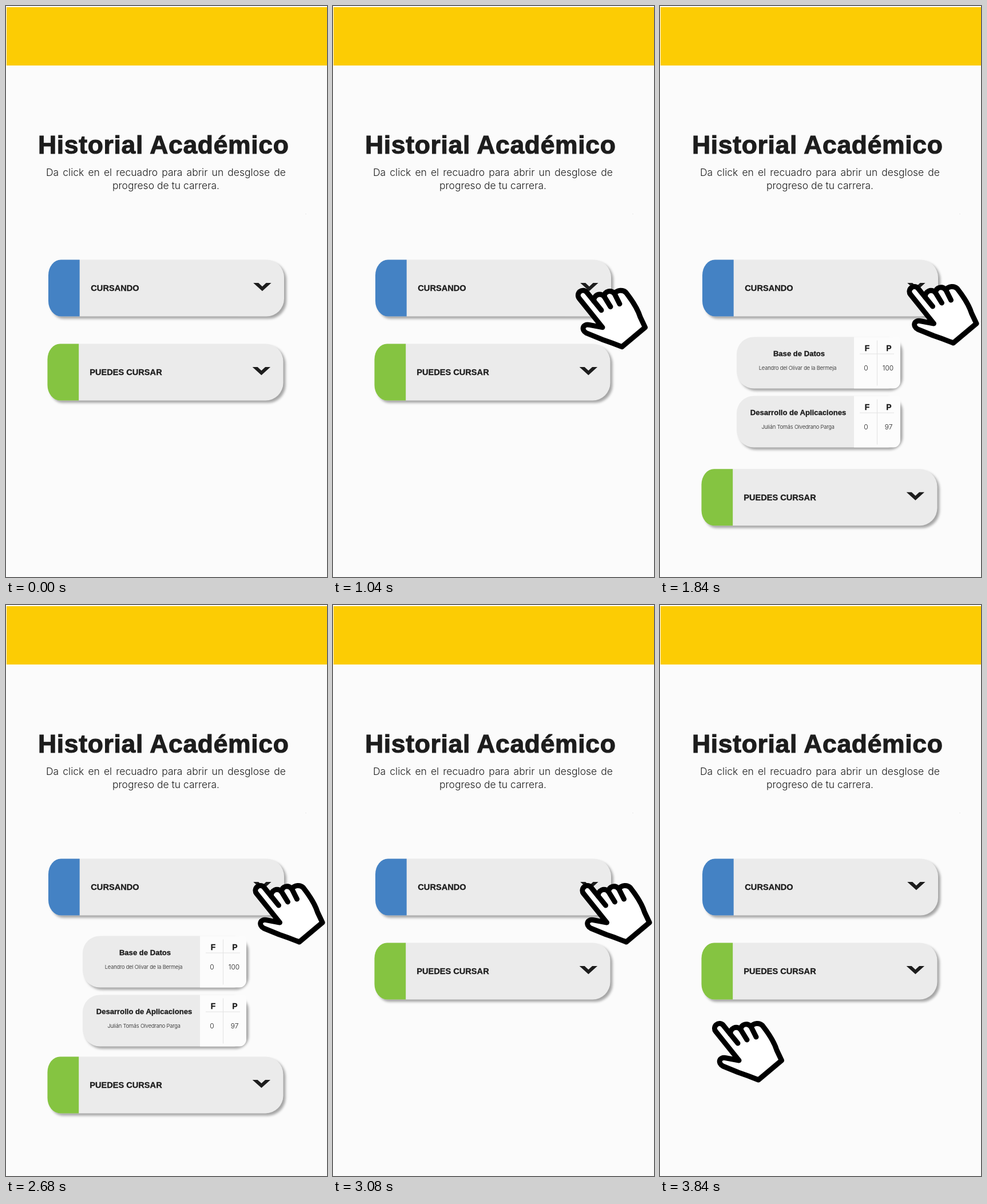
Write an HTML page that moves like this. It is 561 by 998 pixels and loops after 4000 ms.

```html
<!DOCTYPE html>
<html lang="es">
<head>
<meta charset="utf-8">
<title>Historial Académico</title>
<style>
  html, body { margin: 0; width: 100%; height: 100%; overflow: hidden; background: #fbfbfb; }
  svg { position: absolute; left: 0; top: 0; display: block; }
  text {
    font-family: "Liberation Sans", Arial, sans-serif; font-weight: 700;
    fill: #1d1d1d; stroke: #1d1d1d; stroke-width: .3;
  }
  .intro {
    position: absolute; left: 70px; top: 279px; width: 419px;
    font: 300 17.5px/23px Inter, "Liberation Sans", sans-serif; color: #1d1d1d; white-space: nowrap;
  }
  .spread { text-align: justify; text-align-last: justify; }
  .center { text-align: center; }
  .title { font-size: 44.5px; letter-spacing: .65px; stroke-width: 1.1; }
  .label { font-size: 14.6px; }
  .subject { font-size: 13.1px; text-anchor: middle; }
  .head { font-size: 14px; text-anchor: middle; }
  .teacher, .score {
    font-family: Inter, "Liberation Sans", sans-serif; font-weight: 300; text-anchor: middle; stroke: none;
  }
  .teacher { font-size: 9.4px; letter-spacing: -.2px; }
  .score { font-size: 12px; }
  .shadow { filter: drop-shadow(4px 4px 2px rgba(0, 0, 0, .34)); }
  .card .shadow { filter: drop-shadow(3px 3px 2px rgba(0, 0, 0, .34)); }
</style>
</head>
<body>
<svg width="561" height="998" viewBox="0 0 561 998">
  <defs>
    <g id="bar">
      <path class="shadow" fill="#ebebeb" d="M22 0H381a31 31 0 0 1 31 31v37a31 31 0 0 1-31 31H22a22 27 0 0 1-22-27V27a22 27 0 0 1 22-27z"/>
      <path fill="currentColor" d="M22 0H54.700V99H22a22 27 0 0 1-22-27V27a22 27 0 0 1 22-27z"/>
      <path fill="#1d1d1d" d="M358.200 40.500h9l6.700 6.200 6.700-6.200h9l-15.700 14.200z"/>
    </g>
    <g id="card">
      <path class="shadow" fill="#ebebeb" d="M30 0H264a22 22 0 0 1 22 22v46a22 22 0 0 1-22 22H30a30 30 0 0 1-30-30V30a30 30 0 0 1 30-30z"/>
      <path fill="#fcfcfc" d="M205 0H282a4 4 0 0 1 4 4v74a12 12 0 0 1-12 12H205z"/>
      <path fill="none" stroke="#e2e2e2" d="M215 29.500h60M245.500 6v79"/>
      <text class="head" x="228" y="24.500">F</text>
      <text class="head" x="266" y="24.500">P</text>
      <text class="score" x="226" y="58">0</text>
    </g>
  </defs>

  <path fill="#fff" d="M0 0H561V2H1V998H0z"/>
  <path fill="#fccc04" d="M1 2H561V104H1z"/>
  <text class="title" x="56" y="258">Historial Académico</text>
  <path fill="#e8e8e8" d="M523 363h2v1h-2z"/>

  <g class="card" id="first">
    <use href="#card"/>
    <text class="subject" x="109" y="33.500">Base de Datos</text>
    <text class="teacher" x="106.500" y="57">Leandro del Olivar de la Bermeja</text>
    <text class="score" x="264.500" y="58">100</text>
  </g>
  <g class="card" id="second">
    <use href="#card"/>
    <text class="subject" x="107.500" y="33.500">Desarrollo de Aplicaciones</text>
    <text class="teacher" x="107" y="57">Julián Tomás Olvedrano Parga</text>
    <text class="score" x="265.500" y="58">97</text>
  </g>

  <g transform="translate(74 443.5)">
    <use href="#bar" color="#4482c4"/>
    <text class="label" x="74.300" y="54.500">CURSANDO</text>
  </g>
  <g id="available">
    <use href="#bar" color="#85c441"/>
    <text class="label" x="73.700" y="54.500">PUEDES CURSAR</text>
  </g>

  <g id="hand" stroke="#000" stroke-width="9" stroke-linecap="round" stroke-linejoin="round" visibility="hidden">
    <path fill="#fff" d="M47 69L6.400 18.400A8.500 8.500 0 0 1 19.600 7.600L32 23C31 13 43 7 50 15C51 5 62 3 68 10C73 3 83 3 88 8C99 22 109 38 113 51L121.500 69L81 103Q64 96 46 90L19 79C9 73 13 63 23 64.500z"/>
    <path fill="none" d="M32 23L45 39M50 15L61 33M68 10L77 28"/>
  </g>
</svg>
<div class="intro">
  <div class="spread">Da click en el recuadro para abrir un desglose de</div>
  <div class="center">progreso de tu carrera.</div>
</div>
<script>
  const LOOP = 4000, STEP = 40;
  const [first, second, available, hand] =
    ['first', 'second', 'available', 'hand'].map(id => document.getElementById(id));

  const progress = (t, from, to) => Math.min(1, Math.max(0, (t - from) / (to - from)));
  const easeOut = p => 1 - (1 - p) ** 1.65;
  const mix = (a, b, p) => a + (b - a) * p;
  const place = (el, x, y) => el.setAttribute('transform', `translate(${x} ${y})`);

  function draw(now) {
    const t = Math.floor((now % LOOP) / STEP) * STEP;

    const barOpen = progress(t, 1360, 1730) - progress(t, 2640, 3080);
    place(available, 72.5, mix(590.5, 809.3, barOpen));

    const cardsOpen = progress(t, 1447, 1840) - progress(t, 2680, 3080);
    place(first, 134, mix(444, 578.5, cardsOpen));
    place(second, 134, mix(444, 681.5, cardsOpen));

    const arrive = easeOut(progress(t, 560, 1120));
    const leave = progress(t, 3280, 3840);
    place(hand, mix(mix(244, 431.5, arrive), 91, leave), mix(mix(652, 486, arrive), 727, leave));
    hand.setAttribute('visibility', t < 560 ? 'hidden' : 'visible');
  }

  const start = performance.now();
  function tick() {
    draw(performance.now() - start);
    requestAnimationFrame(tick);
  }
  tick();
</script>
</body>
</html>
```
